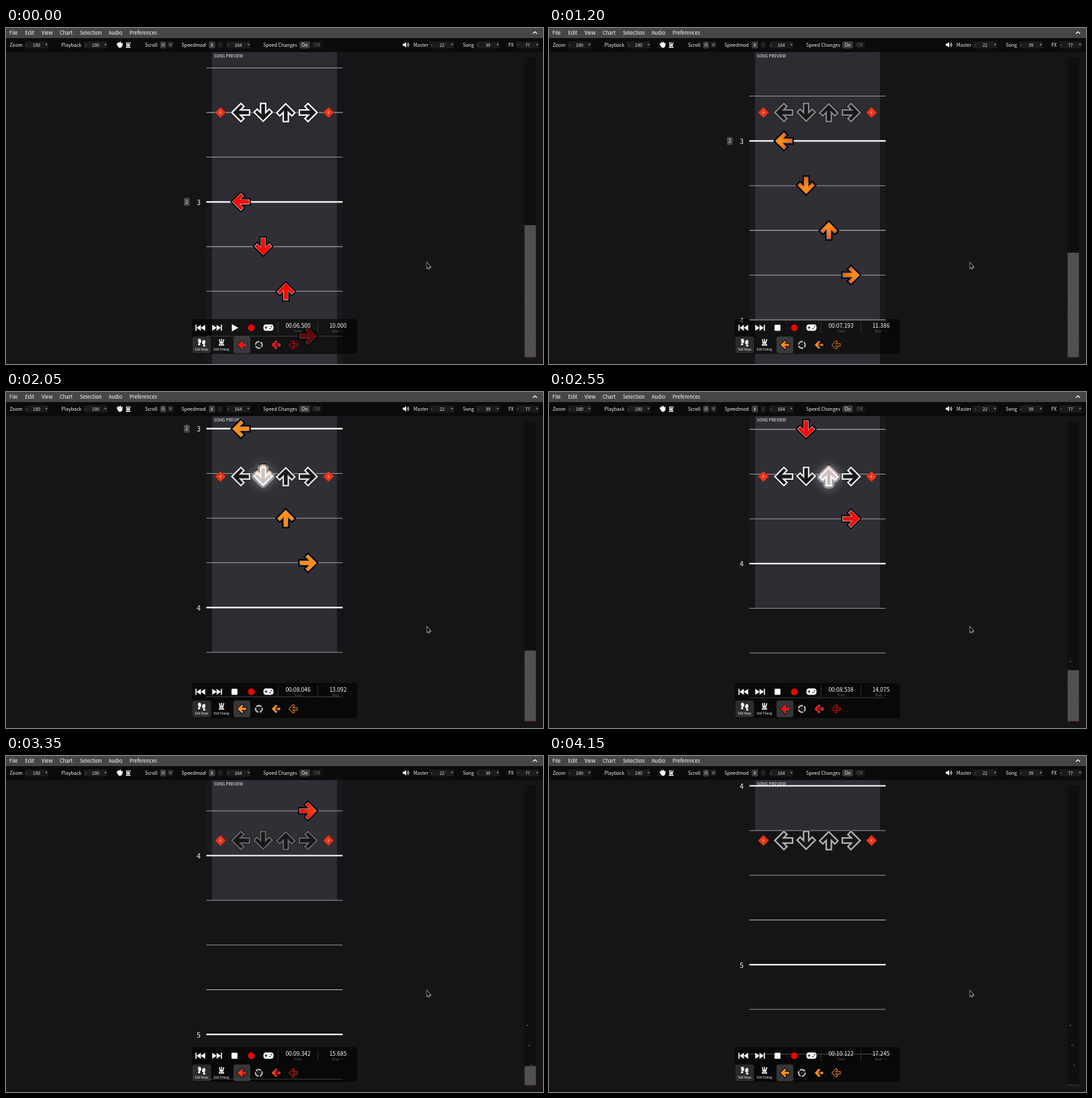
Write an HTML page with a canvas that moves like this. It is 800 px wide and 501 px high and loops after 4200 ms.

```html
<!DOCTYPE html>
<html lang="en">
<head>
<meta charset="utf-8">
<title>Step editor</title>
<style>
html, body { margin: 0; width: 100%; height: 100%; overflow: hidden; background: #151517; }
canvas { display: block; }
</style>
</head>
<body>
<canvas id="stage" width="800" height="501"></canvas>
<script>
const c = document.getElementById('stage').getContext('2d');
const FONT = '"Noto Sans CJK JP", "Noto Sans CJK SC", "Noto Sans CJK", "Noto Sans", sans-serif';
const LOOP = 4200, STEP = 50, PLAY_AT = 450;
const BEAT_H = 66.67, HIT_Y = 126, LAG = .022;
const TURNS = [0, -Math.PI / 2, Math.PI / 2, Math.PI];
const colX = i => 349.4 + 33.7 * i;

// [loop time in ms, song time in s]
const clock = [[0, 6.5], [500, 6.5], [750, 6.732], [1600, 7.603], [2550, 8.5377],
  [3050, 9.037], [3700, 9.6986], [4150, 10.1224], [4200, 10.172]];

function songTime(t) {
  const i = Math.max(1, clock.findIndex(k => k[0] >= t));
  const [t0, s0] = clock[i - 1], [t1, s1] = clock[i];
  return s0 + (s1 - s0) * (t - t0) / (t1 - t0);
}

// colour helpers
const clamp = (v, a = 0, b = 1) => Math.min(b, Math.max(a, v));
const rgb = a => `rgb(${a.map(Math.round)})`;
function ramp(stops, v) {
  let i = 1;
  while (i < stops.length - 1 && stops[i][0] < v) i++;
  const [p, a] = stops[i - 1], [q, b] = stops[i];
  const k = clamp((v - p) / (q - p));
  return rgb(a.map((x, n) => x + (b[n] - x) * k));
}
const RED = [252, 8, 10], YELLOW = [255, 214, 40], ORANGE = [252, 142, 28];
const body = [[0, RED], [.02, YELLOW], [.16, YELLOW], [.35, ORANGE], [.85, ORANGE], [1.3, RED]];
const GREY = [178, 174, 174], GOLD = [222, 186, 74], SLATE = [86, 88, 94];
const edge = [[.3, GREY], [.45, GOLD], [.65, GOLD], [1, SLATE], [1.4, SLATE], [1.9, GREY]];

// drawing helpers
function text(s, x, y, size = 7.1, color = '#f2f2f2', align = 'left') {
  c.font = `${size}px ${FONT}`;
  c.fillStyle = color;
  c.textAlign = align;
  c.fillText(s, x, y + size * .365);
}
function rect(x, y, w, h, color, r = 0) {
  c.fillStyle = color;
  c.beginPath();
  c.roundRect(x, y, w, h, r);
  c.fill();
}
function disc(x, y, rx, color, ry = rx, turn = 0) {
  c.fillStyle = color;
  c.beginPath();
  c.ellipse(x, y, rx, ry, turn, 0, 7);
  c.fill();
}
function shape(d, color, line, x = 0, y = 0) {
  c.save();
  c.translate(x, y);
  const p = new Path2D(d);
  if (line) {
    c.strokeStyle = color;
    c.lineWidth = line;
    c.stroke(p);
  } else {
    c.fillStyle = color;
    c.fill(p);
  }
  c.restore();
}
function at(x, y, turn, scale, draw) {
  c.save();
  c.translate(x, y);
  c.rotate(turn);
  c.scale(scale, scale);
  draw();
  c.restore();
}

const ARROW = 'M-11.4 0L.6-12L3.6-9L-2.7-2.7H12.4V2.7H-2.7L3.6 9L.6 12Z';
const arrowPath = new Path2D(ARROW);

// the colour sweeps in chevrons from the tail to the tip
function noteArrow(x, y, turn, phase, scale = 1) {
  at(x, y, turn, scale, () => {
    shape(ARROW, '#000', 5.6);
    shape(ARROW, ramp(edge, phase), 2.2);
    c.clip(arrowPath);
    for (let i = 18; i > 0; i--) {
      const r = i * 1.5;
      const u = phase - .37 - (1 - i / 18) * .28;
      shape(`M${-r} 0L0 ${-r}L${r} 0L0 ${r}Z`, ramp(body, u), 0, -11.4, 0);
    }
  });
}
function receptor(x, turn, light) {
  at(x, HIT_Y, turn, 1, () => {
    shape(ARROW, '#0c0c0d', 6);
    shape(ARROW, rgb([1, 1, 1].map(v => v * light * 245)), 4.6);
    shape(ARROW, '#17171a');
  });
}
function flash(x, turn, power) {
  at(x, HIT_Y, turn, 1, () => {
    c.globalAlpha = power;
    c.shadowColor = 'rgba(255,255,255,.9)';
    c.shadowBlur = 14;
    c.lineJoin = 'round';
    shape(ARROW, 'rgba(255,255,255,.45)', 11);
    c.shadowBlur = 0;
    c.lineJoin = 'miter';
    shape(ARROW, '#fff', 4.4);
    shape(ARROW, 'rgba(165,160,160,.6)');
  });
}

function field(beat, phase) {
  const yOf = b => HIT_Y + (b - beat) * BEAT_H;
  rect(307, 30, 186, Math.max(0, yOf(17) - 30), '#2d2c33');
  rect(298.5, yOf(12), 203, 4 * BEAT_H, 'rgba(255,255,255,.016)');
  text('SONG PREVIEW', 309.5, 41.5, 6.1);

  for (let b = Math.floor(beat) - 2; b < beat + 6; b++) {
    const y = yOf(b), bar = b % 4 === 0;
    rect(298.5, y - (bar ? 1.1 : .4), 203, bar ? 2.2 : .8, bar ? '#fff' : '#c4c4c6');
    if (bar) text(b / 4, 287, y + 1, 10, '#fff', 'center');
  }
  rect(265, yOf(12) - 6, 8.6, 12, '#48484b', 2);
  text('2', 269.3, yOf(12), 7, '#eee', 'center');

  for (const x of [319.5, 480.5]) {
    shape('M0-8.5L8.5 0L0 8.5L-8.5 0Z', '#8f1c0e', 0, x, HIT_Y);
    shape('M0-7.5L7.5 0L0 7.5L-7.5 0Z', '#e8381d', 0, x, HIT_Y);
    text('4', x, HIT_Y, 4.2, '#fff', 'center');
  }
  const light = Math.max(.4, 1 - 1.25 * (beat % 1));
  TURNS.forEach((turn, i) => receptor(colX(i), turn, light));
  TURNS.forEach((turn, i) => noteArrow(colX(i), yOf(12 + i), turn, phase));
  TURNS.forEach((turn, i) => {
    const age = beat - 12 - i;
    if (age >= 0 && age < .19) flash(colX(i), turn, 1 - (age / .19) ** 2);
  });
}

function stepper(value, x, half) {
  rect(x - half, 20, half * 2, 10.5, '#1b1b1d', 2);
  text('-', x - half + 3, 25, 6.6, '#ddd', 'center');
  text(value, x, 25.2, 6.5, '#f2f2f2', 'center');
  text('+', x + half - 3, 25, 6.6, '#ddd', 'center');
}
function metronome(x, y, s) {
  at(x, y, 0, s, () => {
    shape('M-3-4.5L-2 2M0-5V2M3.6-4.5L1.5 2', '#fff', 1.5);
    shape('M-2.6 0H2.6L3 2H-3ZM-4 3H4V5H-4Z', '#fff');
  });
}

function header() {
  rect(0, 0, 800, 15, '#464648');
  rect(0, 15, 800, 21, '#0b0b0c');
  [['File', 5], ['Edit', 28.5], ['View', 53], ['Chart', 80], ['Selection', 110],
    ['Audio', 153], ['Preferences', 184]].forEach(([s, x]) => text(s, x, 7.6, 7.5, '#fff'));
  shape('M-3 1.5L0-1.5L3 1.5', '#fff', 1.2, 788, 7);

  [['Zoom', 5.5], ['Playback', 82.5], ['Scroll', 207], ['Speedmod', 261.5],
    ['Speed Changes', 383], ['Master', 607], ['Song', 680.5], ['FX', 748.5]]
    .forEach(([s, x]) => text(s, x, 25.2));
  [[100, 45.5, 17.5], [100, 133.5, 17.5], [164, 346, 18], [22, 649.5, 18],
    [39, 718, 17.5], [77, 777, 17]].forEach(a => stepper(...a));

  // clap and metronome toggles
  disc(169.5, 25.6, 3.4, '#fff', 4, -.5);
  shape('M-4-2L-1 3M-2-4L1 1M1-4.5L3 0M4-3V1', '#fff', 1.2, 169, 25);
  metronome(182, 25.2, .85);

  rect(229.5, 20, 9, 10.5, '#38383a', 2);
  rect(240.5, 20, 9, 10.5, '#1b1b1d', 2);
  shape('M-2.4 0L0-2L2.4 0M-2.4 2.4L0 .4L2.4 2.4', '#ddd', .8, 234, 25);
  shape('M-2.4-2.4L0-.4L2.4-2.4M-2.4 0L0 2L2.4 0', '#bbb', .8, 245, 25);

  rect(302, 20, 9.5, 10.5, '#38383a', 2);
  rect(314.5, 20, 9.5, 10.5, '#151517', 2);
  text('X', 306.7, 25.2, 6.6, '#fff', 'center');
  text('C', 319.3, 25.2, 6.6, '#666', 'center');
  rect(437, 20, 16, 10.5, '#38383a', 2);
  rect(455, 20, 16, 10.5, '#151517', 2);
  text('On', 445, 25.2, 7, '#fff', 'center');
  text('Off', 463, 25.2, 7, '#666', 'center');

  shape('M-5-1.6H-3L0-4V4L-3 1.6H-5Z', '#fff', 0, 596, 25);
  shape('M1.5-1.7Q2.8 0 1.5 1.7M2.8-3.3Q5.6 0 2.8 3.3', '#fff', 1, 596, 25);
}

function overview(beat) {
  rect(772.5, 44, 17, 447, '#0f0f11');
  const top = 294 + (beat - 10) * 29.6;
  if (top < 490.5) rect(772.5, top, 17, 490.5 - top, '#505052');
  for (let i = 0; i < 3; i++) rect(775 + 3 * i, 401.2 + 29.7 * i, 3, 1, '#8f5557');
  rect(772.5, 490.4, 17, .8, '#7a3436');
}

function controls(time, beat, phase, playing) {
  rect(277, 434, 246, 52, 'rgba(0,0,0,.6)', 4);
  const skip = 'M-7.2-4.5H-5.6V4.5H-7.2ZM-5.6 0L.8-4.5V4.5ZM.8 0L7.2-4.5V4.5Z';
  shape(skip, '#fff', 0, 289.5, 447);
  at(314.5, 447, Math.PI, 1, () => shape(skip, '#fff'));
  if (playing) rect(336, 442.6, 8.8, 8.8, '#fff', 1);
  else shape('M-4.5-5.5L5 0L-4.5 5.5Z', '#fff', 0, 341, 447);
  disc(365.5, 447, 5, '#f00404');

  rect(383.5, 442, 15, 9.6, '#fff', 4);
  shape('M-5.5 0H-1.5M-3.5-2V2', '#111', 1.1, 391, 446.8);
  disc(393.4, 448.2, .9, '#111');
  disc(395.4, 445.4, .9, '#111');

  rect(404.7, 438, .8, 17, '#3c3c3f');
  rect(464.3, 438, .8, 17, '#3c3c3f');
  text('00:' + time.toFixed(3).padStart(6, '0'), 435, 444.2, 8.4, '#fff', 'center');
  text(beat.toFixed(3), 494.5, 443.6, 8.4, '#fff', 'center');
  text('Time', 435, 452.2, 5, '#5f5f62', 'center');
  text('Beat', 491, 452, 5, '#5f5f62', 'center');
  shape('M-1.3-.6L0 .7L1.3-.6', '#5f5f62', .7, 501, 452);

  rect(277.5, 460, 28, 25, 'rgba(75,75,78,.55)', 3);
  for (const [x, y, turn] of [[288.4, 466.6, -.15], [294.6, 468.6, .15]]) {
    disc(x, y, 2.3, '#fff', 3.4, turn);
    disc(x + turn * 5, y + 5, 1.7, '#fff', 1.6);
  }
  metronome(321, 468.5, 1);
  text('Edit Steps', 291.4, 479.5, 4.3, '#fff', 'center');
  text('Edit Timing', 321, 479.5, 4.3, '#fff', 'center');

  rect(339, 460, 25, 25, 'rgba(85,85,88,.6)', 3);
  noteArrow(351.4, 472.5, 0, phase, .5);

  // mine
  disc(376.7, 472.5, 6.8, '#0a0a0a');
  at(376.7, 472.5, beat * Math.PI / 2, 1, () => {
    for (let i = 0; i < 3; i++) {
      c.beginPath();
      c.arc(0, 0, 4.9, i * 2.094, i * 2.094 + 1.75);
      c.strokeStyle = '#c4c0be';
      c.lineWidth = 2.1;
      c.stroke();
    }
  });
  disc(376.7, 472.5, 2.4, '#2a2a2c');

  // fake and lift
  noteArrow(402, 472.5, 0, phase, .5);
  rect(401.4, 470.4, 3, 4.2, '#0c0c0c', 1);
  disc(403, 472.5, .9, ramp(body, phase - .37));
  at(427.6, 472.5, 0, .5, () => {
    shape(ARROW, '#000', 5.6);
    shape(ARROW, ramp(body, phase - .45), 3.4);
    shape(ARROW, '#121213');
  });
}

function pointer() {
  const d = 'M0 0V8.2L1.9 6.6L3 9.2L4.3 8.6L3.2 6.1H5.5Z';
  shape(d, '#e8e8e8', 1.1, 627.2, 350);
  shape(d, '#0a0a0a', 0, 627.2, 350);
}

function frame(now) {
  const t = Math.floor(now % LOOP / STEP) * STEP;
  const time = songTime(t), beat = 10 + 2 * (time - 6.5);
  const shown = Math.max(10, beat - LAG), phase = beat % 2;
  rect(0, 0, 800, 501, '#151517');
  field(shown, phase);
  overview(beat);
  controls(time, beat, phase, t >= PLAY_AT);
  header();
  pointer();
  requestAnimationFrame(frame);
}
requestAnimationFrame(frame);
</script>
</body>
</html>
```
